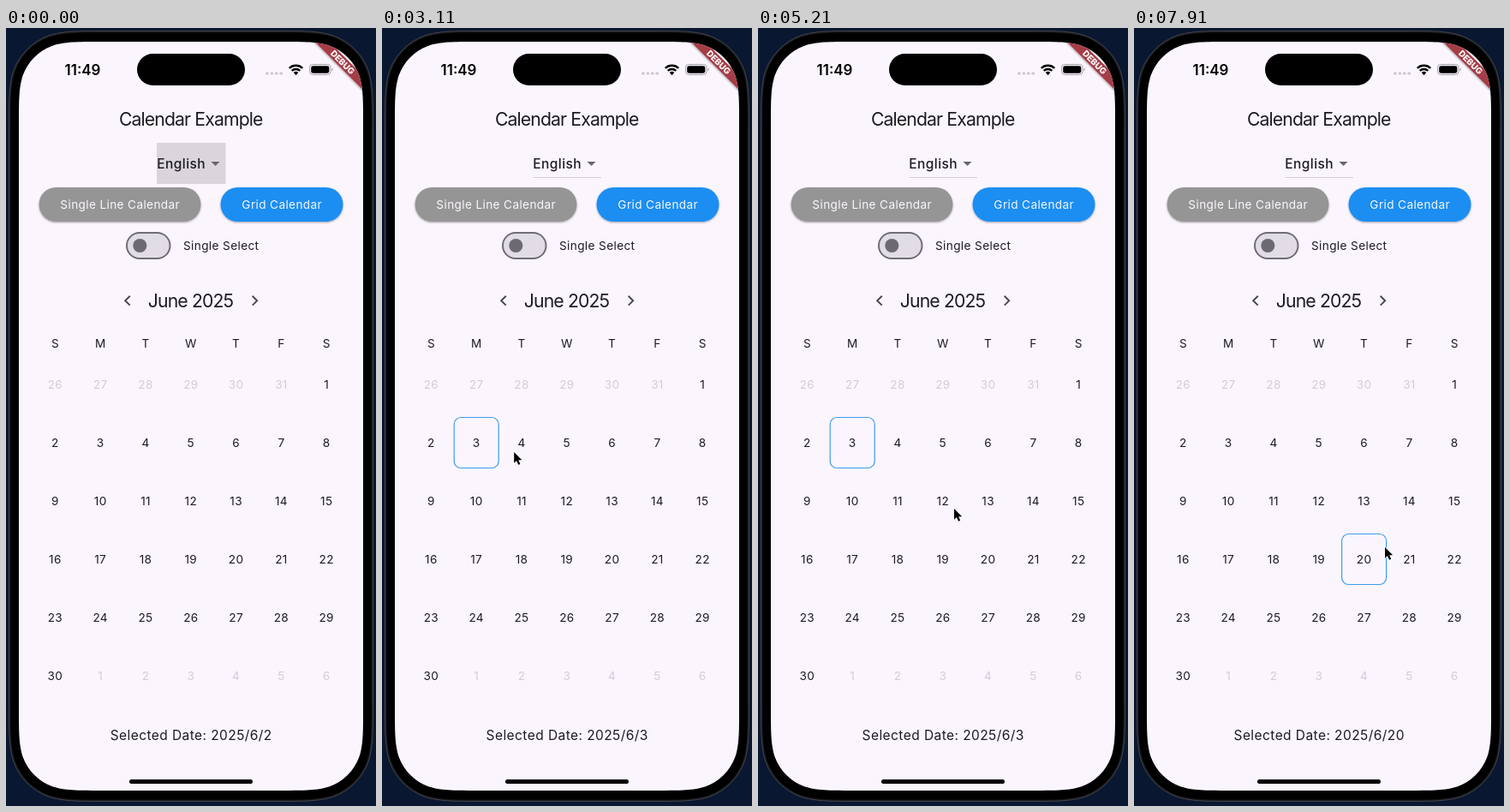
These frames come from a looping animation (432x908 px, 8000 ms). An HTML page:

```html
<!DOCTYPE html>
<html lang="en">
<head>
<meta charset="utf-8">
<title>Calendar</title>
<style>
  html, body { margin: 0; width: 100%; height: 100%; overflow: hidden; background: #0a1730; }
  svg { display: block; width: 100vw; height: 100vh; }
  text { font-family: Inter, Roboto, sans-serif; fill: #1d1b20; text-anchor: middle; }
  .title { font-size: 21.2px; letter-spacing: -.86px; }
  .small { font-size: 13.6px; letter-spacing: .38px; }
  .button { fill: #fbf6ff; }
  .day { font-size: 13.6px; letter-spacing: .3px; }
  .faded { fill: #d3cdd6; }
  .body { font-size: 15.5px; letter-spacing: .43px; }
</style>
</head>
<body>
<svg viewBox="0 0 432 908">
  <defs>
    <clipPath id="clip"><path id="screen"/></clipPath>
    <filter id="lift" x="-10%" y="-20%" width="120%" height="150%">
      <feDropShadow dx="0" dy="1" stdDeviation="1" flood-color="#000" flood-opacity=".35"/>
    </filter>
  </defs>

  <rect width="432" height="908" fill="#0a1730"/>
  <path id="rim" fill="#161619" stroke="#46474d"/>
  <path id="bezel"/>

  <g clip-path="url(#clip)">
    <rect x="15" y="16" width="402" height="874" fill="#fbf5fe"/>
    <g transform="translate(417 16) rotate(45)">
      <rect x="-42" y="28" width="84" height="12" fill="#a53c46" filter="url(#lift)"/>
      <text y="37.6" font-size="10" font-weight="800" style="fill:#fff">DEBUG</text>
    </g>
  </g>

  <text x="89.5" y="54.7" font-size="17" font-weight="600" style="fill:#000">11:49</text>
  <rect x="153" y="30" width="126" height="37" rx="18.5"/>
  <g id="signal" fill="#cbc5cd"></g>
  <g fill="none" stroke="#000" stroke-width="2.3">
    <path d="M330.8 46.8A11.2 11.2 0 0 1 346.2 46.8"/>
    <path d="M333.7 49.9A7 7 0 0 1 343.3 49.9"/>
  </g>
  <path d="M338.5 55L335.8 52.2A3.8 3.8 0 0 1 341.2 52.2Z"/>
  <rect x="354.5" y="42.5" width="24.5" height="12" rx="3.8" fill="none" stroke="#a5a1a8"/>
  <rect x="356.2" y="44.2" width="21.1" height="8.6" rx="2.4"/>
  <path d="M380.5 46.5a2.2 2.2 0 0 1 0 4z" fill="#a5a1a8"/>

  <text class="title" x="215.7" y="114">Calendar Example</text>
  <rect x="176" y="174" width="80" height="1" fill="#d5cfd8"/>
  <rect id="focus" x="176" y="134" width="80.5" height="48" fill="#d9d3dc" fill-opacity=".96"/>
  <text class="body" x="204.7" y="164" font-weight="500">English</text>
  <path d="M239.5 156h10l-5 5z" fill="#69666c"/>

  <rect x="38.5" y="186" width="189" height="40" rx="20" fill="#959595" filter="url(#lift)"/>
  <text class="small button" x="133.2" y="211">Single Line Calendar</text>
  <rect x="250.5" y="186" width="143" height="40" rx="20" fill="#1e8ef2" filter="url(#lift)"/>
  <text class="small button" x="322.2" y="211">Grid Calendar</text>

  <rect x="141" y="239" width="50.5" height="30" rx="15" fill="#e1dce6" stroke="#716d76" stroke-width="2"/>
  <circle cx="156.3" cy="254" r="8" fill="#6d6972"/>
  <text class="small" x="251.2" y="259">Single Select</text>

  <g fill="none" stroke="#49454f" stroke-width="1.9">
    <path d="M144.7 312.8L139.2 318.2L144.7 323.6"/>
    <path d="M287.7 312.8L293.2 318.2L287.7 323.6"/>
  </g>
  <text class="title" x="215.5" y="325.7">June 2025</text>

  <g id="grid"></g>
  <rect id="pick" width="52" height="59" rx="8" fill="none" stroke="#3d9bee" stroke-width="1.2"/>
  <text id="label" class="body" x="216.2" y="831"></text>
  <rect x="144" y="877" width="144" height="5" rx="2.5"/>
  <path id="cursor" d="M0 0V15.2L3.5 12L6 17.6L8.6 16.5L6.2 11.1H11Z"
        stroke="#fff" stroke-width="1.8" paint-order="stroke"/>
</svg>
<script>
  const LOOP = 8000;
  const $ = id => document.getElementById(id);
  const colX = i => 57.4 + 52.8 * i;
  const rowY = i => 416 + 68 * i;

  function add(parent, tag, attrs, text = '') {
    const el = document.createElementNS('http://www.w3.org/2000/svg', tag);
    for (const key in attrs) el.setAttribute(key, attrs[key]);
    el.textContent = text;
    parent.append(el);
  }

  // Rounded rectangle whose corners blend smoothly into the sides
  function smoothRect(x, y, w, h, r) {
    const curve = [
      [1.529, 0], [1.088, 0], [.868, 0], [.632, .075], [.373, .169],
      [.169, .373], [.075, .632], [0, .868], [0, 1.088], [0, 1.529]
    ];
    const corner = (right, bottom) => {
      const pts = curve.map(([a, b]) => [
        right ? x + w - a * r : x + a * r,
        bottom ? y + h - b * r : y + b * r
      ]);
      if (right === bottom) pts.reverse();
      return `${pts[0]}C${pts.slice(1).join(' ')}`;
    };
    return `M${corner(false, false)}L${corner(true, false)}L${corner(true, true)}L${corner(false, true)}Z`;
  }

  $('rim').setAttribute('d', smoothRect(3.5, 3.5, 425, 899, 73));
  $('bezel').setAttribute('d', smoothRect(5.5, 5.5, 421, 895, 71));
  $('screen').setAttribute('d', smoothRect(15, 16, 402, 874, 62));

  for (let i = 0; i < 4; i++) add($('signal'), 'circle', { cx: 305 + 5.4 * i, cy: 53, r: 1.8 });

  [...'SMTWTFS'].forEach((d, i) => add($('grid'), 'text', { class: 'day', x: colX(i), y: 373 }, d));
  for (let i = 0; i < 42; i++) {
    const n = i - 5;
    const inside = n >= 1 && n <= 30;
    add($('grid'), 'text', {
      class: inside ? 'day' : 'day faded',
      x: colX(i % 7),
      y: rowY(Math.floor(i / 7)) + 5
    }, n < 1 ? n + 31 : inside ? n : n - 30);
  }

  // Pointer stops: [time, x, y]
  const stops = [
    [250, -14, 556], [720, 51, 493], [1350, 51, 493], [2150, 130, 477], [2850, 130, 477],
    [3600, 213, 538], [4300, 213, 538], [4950, 228, 560], [5650, 228, 560],
    [6150, 244, 564], [6650, 244, 564], [7250, 292, 605], [LOOP, 292, 605]
  ];
  // Taps: [time, day]
  const taps = [[0, 2], [2600, 3], [5500, 12], [7450, 20]];

  const ease = p => p * p * (3 - 2 * p);

  function pointer(t) {
    const next = stops.findIndex(s => s[0] > t);
    if (next < 1) return [-30, 556];
    const [t0, x0, y0] = stops[next - 1];
    const [t1, x1, y1] = stops[next];
    const p = ease((t - t0) / (t1 - t0));
    return [x0 + (x1 - x0) * p, y0 + (y1 - y0) * p];
  }

  function draw(t) {
    const [x, y] = pointer(t);
    $('cursor').setAttribute('transform', `translate(${x + 1} ${y + 1}) scale(.84)`);

    const day = taps.filter(tap => tap[0] <= t).pop()[1];
    const cell = day + 5;
    const picked = t >= taps[1][0];
    $('pick').setAttribute('x', colX(cell % 7) - 26);
    $('pick').setAttribute('y', rowY(Math.floor(cell / 7)) - 29.5);
    $('pick').setAttribute('visibility', picked ? 'visible' : 'hidden');
    $('focus').setAttribute('visibility', picked ? 'hidden' : 'visible');
    $('label').textContent = `Selected Date: 2025/6/${day}`;
  }

  const start = performance.now();
  function tick() {
    draw((performance.now() - start) % LOOP);
    requestAnimationFrame(tick);
  }
  tick();
</script>
</body>
</html>
```
